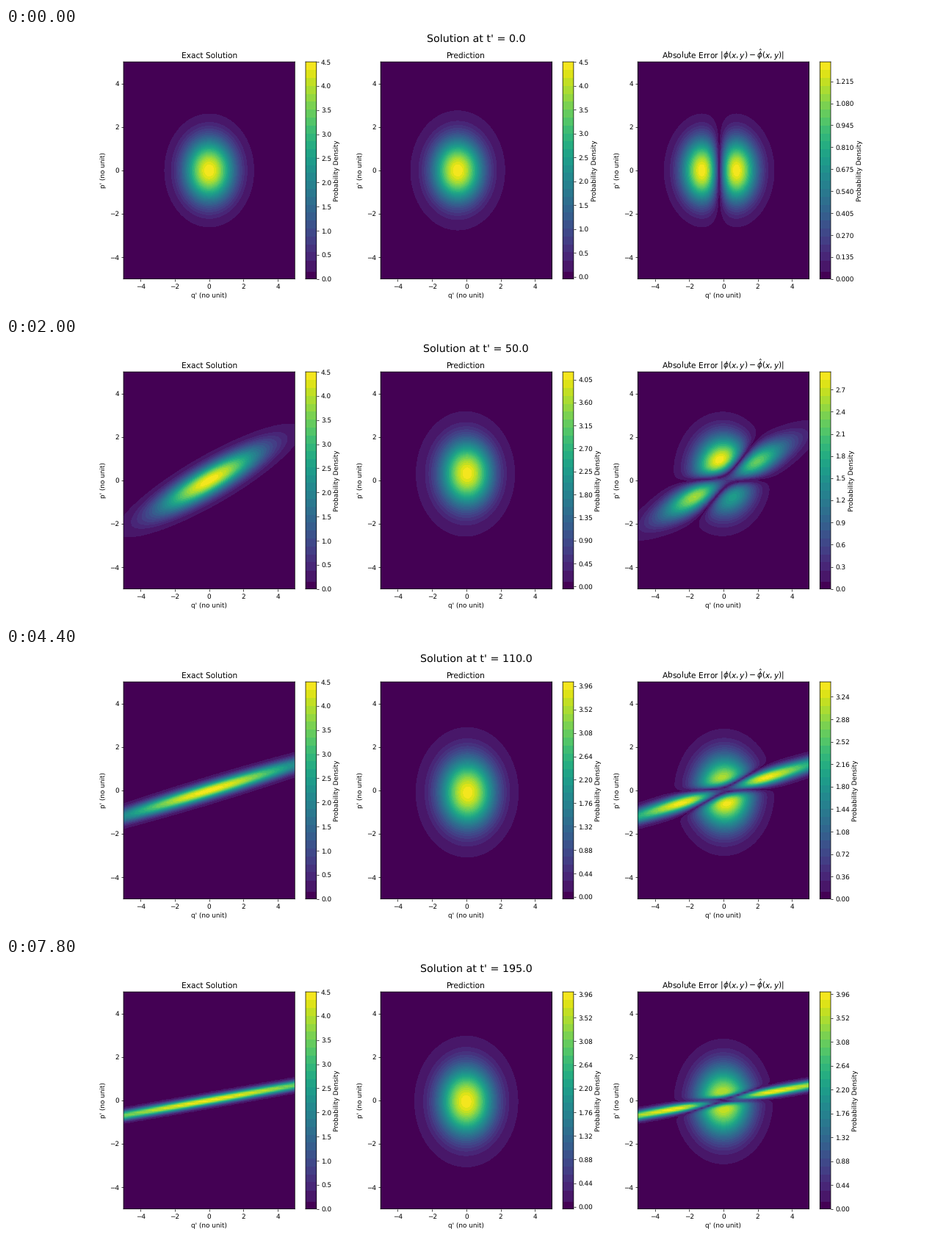
Write a matplotlib script that moves like this. It is 1280 px wide and 384 px high and loops after 8000 ms.

```python
import numpy as np
import matplotlib
import matplotlib.pyplot as plt
from matplotlib.animation import FuncAnimation
from matplotlib.colorbar import make_axes
from matplotlib.patches import Rectangle
from matplotlib.ticker import MaxNLocator

plt.rcParams.update({"font.family": "DejaVu Sans", "text.hinting": "none",
                     "path.snap": False})

FRAMES, INTERVAL, DT = 40, 200, 5.0
PEAK, SHEAR = 4.488, 0.036

# Colour bands as fractions of the colour scale, wider at the dark end
EDGES = np.concatenate([[0, 0.034, 0.087], np.linspace(0.125, 1, 25)])
MIDS = (EDGES[:-1] + EDGES[1:]) / 2
MIDS[0] = 0
COLORS = matplotlib.colormaps["viridis"](MIDS)
LEVELS = np.concatenate([[-1], EDGES[1:-1], [2]])

axis = np.linspace(-5, 5, 100)
Q, P = np.meshgrid(axis, axis)


def exact(t):
    """Gaussian sheared along q at a constant rate."""
    return PEAK * np.exp(-((Q - SHEAR * t * P) ** 2 + P ** 2) / 2)


def predict(t):
    """Gaussian whose centre spirals to rest while it flattens and widens."""
    peak = 3.975 + (PEAK - 3.975) * np.exp(-(t / 50) ** 1.4)
    width = 1.105 - 0.105 * np.exp(-(t / 70) ** 2)
    fade, turn = np.exp(-(t / 87) ** 2), np.pi * t / 92
    cq = -0.5 * fade * np.cos(turn)
    cp = 0.48 * fade * np.sin(turn) - 0.05 * (1 - fade)

    # The outer rings trail a little behind the centre
    far = np.minimum(((Q - cq) ** 2 + (P - cp) ** 2) / 8, 1)
    lag = (t / 60) ** 2
    cq = cq - 0.11 * lag * np.exp(1 - lag) * far
    cp = cp - 0.08 * fade * np.sin(np.pi * t / 60) * far
    r2 = ((Q - cq) ** 2 + (P - cp) ** 2) / width ** 2
    return peak * np.exp(-r2 / 2), peak


def scale(lo, hi):
    """Range and ticks of a colour scale with about 100 round levels."""
    raw = MaxNLocator(101, min_n_ticks=1).tick_values(lo, hi)
    step = raw[1] - raw[0]
    first = int(np.floor(lo / step + 1e-6))
    last = int(np.ceil(hi / step - 1e-6))
    skip = int(np.ceil((last - first + 1) / 10))
    return first * step, last * step, np.arange(0, last + 1, skip) * step


class Panel:
    def __init__(self, ax, title):
        self.ax, self.fill = ax, None
        ax.set_title(title)
        ax.set(xlim=(-5, 5), ylim=(-5, 5), xlabel="q' (no unit)",
               ylabel="p' (no unit)", xticks=range(-4, 5, 2),
               yticks=range(-4, 5, 2))
        ax.set_autoscale_on(False)
        self.bar, _ = make_axes(ax)
        self.bar.set_xticks([])
        self.bar.yaxis.tick_right()
        self.bar.yaxis.set_label_position("right")
        self.bar.set_ylabel("Probability Density")
        for a, b, c in zip(EDGES[:-1], EDGES[1:], COLORS):
            self.bar.add_patch(Rectangle((0, a), 1, b - a, fc=c, lw=0,
                                         antialiased=False,
                                         transform=self.bar.transAxes))

    def show(self, z, lo, hi):
        lo, hi, ticks = scale(lo, hi)
        if self.fill is not None:
            self.fill.remove()
        self.fill = self.ax.contourf(Q, P, (z - lo) / (hi - lo),
                                     levels=LEVELS, colors=COLORS)
        self.bar.set_yticks(ticks)
        self.bar.set_ylim(lo, hi)


fig, axes = plt.subplots(1, 3, figsize=(20, 6), dpi=64)
heading = fig.suptitle("", fontsize=16)
titles = ["Exact Solution", "Prediction",
          r"Absolute Error $|\phi(x,y) - \hat{\phi}(x,y)|$"]
panels = [Panel(ax, title) for ax, title in zip(axes, titles)]


def update(n):
    t = n * DT
    truth = exact(t)
    guess, peak = predict(t)
    error = np.abs(truth - guess)
    panels[0].show(truth, 0, PEAK)
    panels[1].show(guess, -0.01, peak)
    panels[2].show(error, 0, error.max())
    heading.set_text(f"Solution at t' = {t:.1f}")
    return []


anim = FuncAnimation(fig, update, frames=FRAMES, interval=INTERVAL,
                     init_func=lambda: update(0), repeat=True, blit=False)
plt.show()
```
